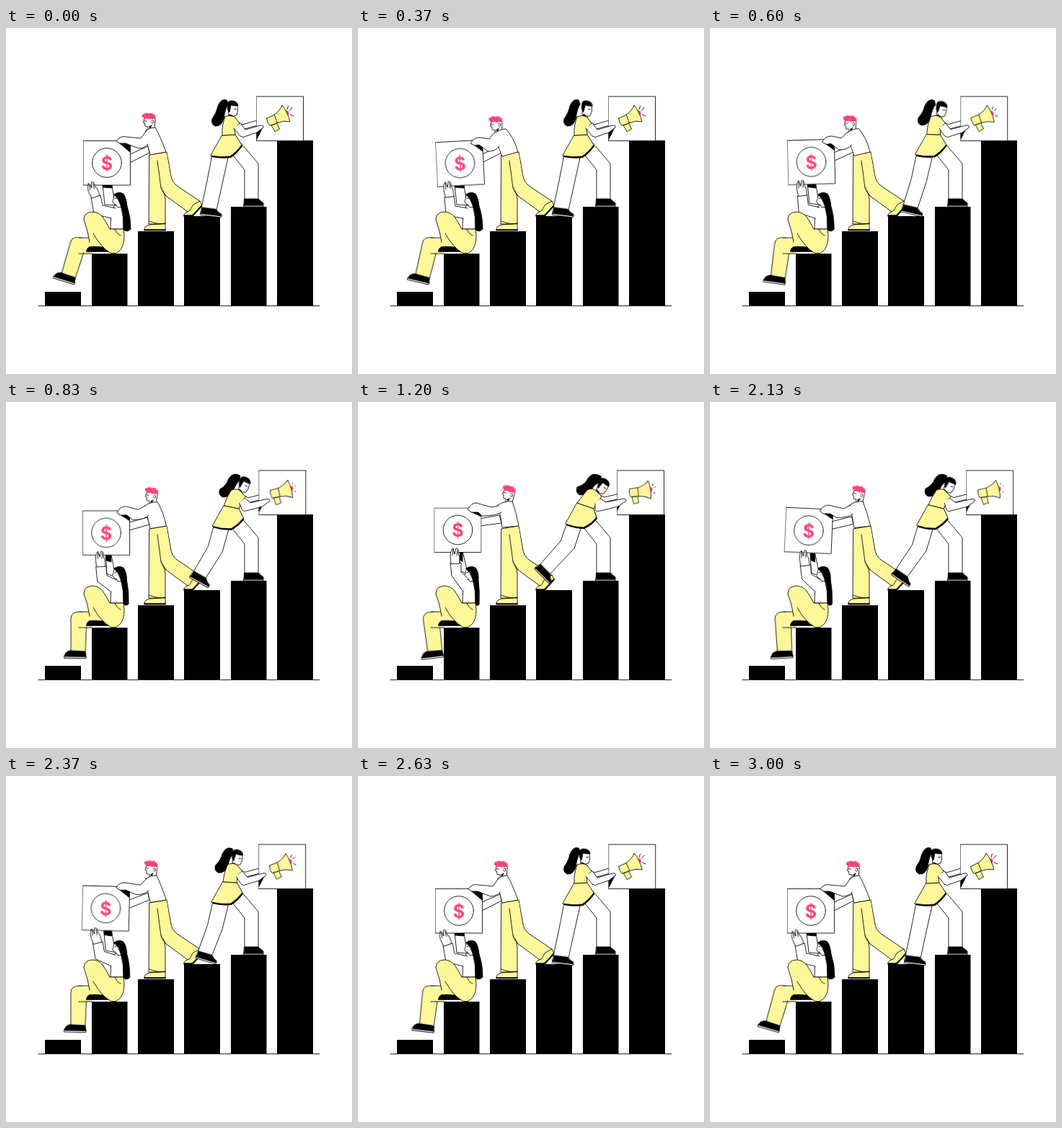
An HTML page without scripts that plays this animation: 480x480 px, repeating every 3030 ms.

```html
<!DOCTYPE html>
<html lang="en">
<head>
<meta charset="utf-8">
<title>Growth steps</title>
<style>
html, body { margin: 0; width: 100%; height: 100%; overflow: hidden; background: #fff; }
svg { display: block; width: 100vw; height: 100vh; fill: #fff; stroke: #000; stroke-width: .85; stroke-linejoin: round; stroke-linecap: round; }
.y { fill: #fff79a; }
.k { fill: #000; }
.p { fill: #ff4578; stroke: none; }
.n { fill: none; }
text { font: 700 25px Inter, Roboto, sans-serif; text-anchor: middle; }

/* Each part has a rest pose --a, a stretched pose --b and, if it dips first, --e */
.shape, .turn, .swing, .rays { animation: 3.03s ease-in-out infinite; }
.shape { d: var(--a); animation-name: shape; }
.turn { animation-name: turn; }
@keyframes shape {
  0%, 88%, 100% { d: var(--a) }
  12% { d: var(--e, var(--a)) }
  40%, 60% { d: var(--b) }
}
@keyframes turn {
  0%, 88%, 100% { transform: var(--a, none) }
  12% { transform: var(--e, var(--a, none)) }
  40%, 60% { transform: var(--b) }
}

#ad { animation-name: slide; }
@keyframes slide {
  0%, 17%, 90%, 100% { transform: none }
  48%, 54% { transform: translate(14.2px, 0) }
}
#tilt { animation-name: tilt; transform-origin: 140px 187px; }
@keyframes tilt {
  0%, 28%, 57%, 87%, 100% { transform: none }
  12% { transform: translate(1.5px, .5px) rotate(-3deg) }
  71% { transform: translate(-2px, -2px) rotate(2.5deg) }
}
#shin { animation-name: kick; transform-origin: 102px 297px; }
@keyframes kick {
  0%, 100% { transform: rotate(17deg) }
  47%, 52% { transform: rotate(-8deg); animation-timing-function: ease-in }
}
.rays { animation-name: rays; }
@keyframes rays {
  0%, 14%, 85%, 100% { stroke-dasharray: 6 20; stroke-dashoffset: 0 }
  27%, 71% { stroke-dasharray: 1 20; stroke-dashoffset: -2 }
  50% { stroke-dasharray: 3 20; stroke-dashoffset: -1 }
}

#face { transform-origin: 198px 130px; --a: translate(0, 0) rotate(0deg); --e: translate(-7px, 4.5px) rotate(-3deg); --b: translate(10px, -2px) rotate(13deg); }
#head { transform-origin: 314px 112px; --e: translate(3px, 0) rotate(4deg); --b: translate(25px, 5px) rotate(28deg); }
#palm { --a: translate(124px, 233px) rotate(-20deg); --e: translate(127px, 233px) rotate(-8deg); --b: translate(135px, 223px) rotate(0deg); }
#shoe { --a: translate(272px, 249px) rotate(7deg); --b: translate(253px, 225px) rotate(45deg); }
#horn { transform-origin: 378px 123px; --b: translate(3px, 0) rotate(17deg); }
#corner { transform-origin: 347px 144px; --b: scale(.65); }
#coin { --b: translate(-1.5px, -9.5px); }
</style>
</head>
<body>
<svg viewBox="0 0 480 480">
  <path class="k" stroke="none" d="M54 366h50v19h-50zM119 313h49.500v72h-49.500zM183 282h50v103h-50zM247 261h50v124h-50zM312 248h49.500v137h-49.500zM376 156h50v229h-50z"/>
  <path d="M45 385.500H435"/>

  <!-- arms behind the coin box -->
  <path class="shape" style="--a:path('M134 217L137 245L151 246L147 217');--b:path('M141 207L142 234L153 240L145 207')"/>
  <path class="shape k" style="--a:path('M134 217L147 217L147 222L135 221Z');--b:path('M142 207L145 207L145 222L142 219Z')"/>
  <path class="shape" style="--a:path('M170 176L197 164L199 173L170 188');--b:path('M168 162L196 157L199 168L168 172')"/>

  <g id="coin" class="turn">
    <g id="tilt" class="swing">
      <path d="M107.500 156.500h65v61.500h-65z"/>
      <path class="shape k" stroke="none" style="--a:path('M156 159L172.500 173L172.500 163L166 159Z');--b:path('M156 161L172.500 169L172.500 163L166 158Z')"/>
      <circle cx="140" cy="187" r="20.300" class="n"/>
      <text x="140" y="196.500" class="p">$</text>
    </g>
  </g>

  <!-- seated woman -->
  <g id="shin" class="swing">
    <path class="y" d="M91 346L90 301Q90 291 102 291Q112 291 112 304L111 346Z"/>
    <path d="M82 352H112V355.500H82Z"/>
    <path class="k" d="M82.500 353Q82 347 90 345L111 346L112 353Z"/>
  </g>
  <path class="y" stroke="none" d="M102 291.400H120V312.600H108Z"/>
  <path class="n" d="M102 291H118M101 313H119"/>
  <path class="y" stroke="none" d="M108 264Q114 284 117 305H142L130 268Z"/>
  <path class="k" d="M111.500 310Q112 304 118 303L137 304L142 310Z"/>
  <path d="M150 247Q157 243 162 248L163 279H145L145.500 264Z"/>
  <path d="M152 231Q148 234 149 238L147.500 240.500L150 244Q154 245 155 249L161 248L160 235Z"/>
  <path class="n" d="M151 236.500l2-.5"/>
  <path class="shape k" style="--a:path('M150 231Q156 226 163 230Q167 236 168 247Q173 262 173 279Q168 284 163 280Q164 262 159 246Q157 238 150 231Z');--b:path('M150 231Q156 226 163 230Q168 236 167 247Q169 262 168 281Q165 284 163 280Q164 262 159 246Q157 238 150 231Z')"/>
  <path class="shape" style="--a:path('M146 264L122 258L118 235L131 232L134 246L152 250');--e:path('M146 264L122 260L120 235L133 233L135 247L152 250');--b:path('M146 263L130 241L128 223L143 223L143 236L152 244')"/>
  <g id="palm" class="turn">
    <path d="M-6 1L-7-9Q-6-19-3-20L-1-12L1-20Q5-21 4-13L6-8L6 1Z"/>
    <path class="n" d="M-4-10l1-9M2-10l1-8"/>
  </g>
  <path class="y" stroke="none" d="M108 264Q110 255 121 255Q129 256 134 262Q139 269 144 279H163Q166 296 160 306Q154 315 145 312Q132 305 121 285Q118 300 121 303L117 303Q115 282 108 264Z"/>
  <path class="n" d="M116 297Q114 282 108 266Q108 255 121 255Q129 256 134 262Q139 269 144 279H163Q166 296 160 306Q154 315 145 312Q132 305 121 285M151 279Q154 286 159 288"/>

  <!-- man -->
  <g id="face" class="turn">
    <path d="M192 125L190.500 131.500L192.500 132L193 136.500L197 137V143H206L207 126Z"/>
    <path class="k" d="M198 137L203 134L200 140Z" stroke="none"/>
    <path class="n" d="M192 129l3 0M201.500 129q3-3 3 1t-3 1"/>
    <path class="p" d="M189 123Q188 119 192 119Q195 117 198 118.500Q203 117 205 120Q209 121 207 127L203 125L200 127L197 125L193 126.500Z"/>
  </g>
  <path class="y" d="M206 180L223 172L229 206Q230 213 236 218L270 241L255 257L222 233L210 218Z"/>
  <path class="y" d="M260 245L269 240L272 246L258 260H247Q247 256 254 254Z"/>
  <path class="n" d="M272 246L259 260.500H247" stroke-width="2"/>
  <path class="y" d="M199 176L222 172Q220 205 216 222Q221 229 221 238V272H198.500Z"/>
  <path class="y" stroke="none" d="M211 185L222.600 172L228 206L217 226Z"/>
  <path class="n" d="M210 184Q213 206 215 222Q217 228 222 233M199 268Q210 273 221 271"/>
  <path class="y" d="M221 272V280H192Q192 274 199 273Z"/>
  <path d="M192 280.300H221" stroke-width="2"/>
  <path class="shape" style="--a:path('M194 142Q200 138 207 138Q214 150 222 172L200 176L197 164Z');--e:path('M189 146Q198 140 205 140Q216 151 222 172L200 178L196 168Z');--b:path('M194 143Q203 137 214 138Q220 154 223 172L200 174L198 160Z')"/>
  <path class="shape" style="--a:path('M196 141L187 153L167 151Q158 149 153 157L158 160L166 160L184 167Q192 167 197 161');--e:path('M190 144L182 154L170 152Q161 151 156 160L162 163L168 162L180 171Q190 172 196 164');--b:path('M195 144L185 146L164 140Q157 140 152 149L157 153L167 153L172 158Q192 158 199 153')"/>

  <!-- standing woman -->
  <path d="M308 168L331 197V240H350V188L326 160Z"/>
  <path class="k" d="M331 237H350L357 243V246H330Z"/>
  <path d="M330 246.300H357V248H330Z"/>
  <path class="shape" style="--a:path('M286 176L279 212L271 250L292 253L300 216L309 176');--b:path('M290 168L281 193L252 226L266 239L300 203L311 170')"/>
  <g id="shoe" class="turn">
    <path d="M-1 8H28V10.500H-1Z"/>
    <path class="k" d="M0 0H19Q24 5 28 6V8.500H-1Z"/>
  </g>
  <path class="shape" style="--a:path('M320 129L328 134L349 128L349 135L328 141L320 137');--b:path('M333 128L342 132L363 127L363 134L342 139L334 136')"/>
  <g style="--a:path('M300 149L318 148L327 162Q320 172 311 178Q298 180 284 177Z');--b:path('M304 140L327 148L331 160Q324 169 313 174Q300 174 288 169Z')">
    <path class="shape k" stroke="none" transform="translate(1 2)"/>
    <path class="shape y"/>
  </g>
  <path class="shape k" style="--a:path('M306 100Q299 97 294 108Q292 118 286 126Q284 133 290 136Q299 137 302 126Q304 112 308 106Z');--b:path('M337 103Q326 96 319 106Q315 115 304 118Q301 126 308 129Q320 129 325 120Q329 113 337 111Z')"/>
  <g id="head" class="turn">
    <path d="M308 106L309 126L317 127L316 122L320 121L321.500 115L321 106Z"/>
    <path class="k" d="M307 106Q307 101 313 101Q321 101 322 108Q315 108 312 107L310 117L307.500 113Z"/>
    <path class="k" d="M309.500 119L316 122L310 124Z" stroke="none"/>
    <path class="n" d="M316.500 112.500h3"/>
  </g>
  <path class="shape y" style="--a:path('M304 123Q312 120 318 124L324 132L317 139L318 148L300 149Q299 136 304 123Z');--b:path('M318 122Q324 119 329 122L338 131L333 138L327 148L304 140Q310 132 318 122Z')"/>

  <g id="ad" class="swing">
    <path d="M347.500 95h65v61.500h-65z"/>
    <path id="corner" class="turn k" stroke="none" d="M347.500 144L357 137L347.500 156Z"/>
    <g id="horn" class="turn">
      <circle cx="389" cy="118" r="3.600" class="p"/>
      <path class="y" d="M368.500 135L375.500 132L379.500 140L373.500 143.500Z"/>
      <path class="y" d="M361.500 125.500L372 120.500Q380 115 383 107Q391 117 394 130Q385 128 376.500 131.500L366 135.500Q362 131 361.500 125.500Z"/>
      <path class="n" d="M372 120.500L376.500 131.500"/>
      <path class="rays n" d="M390 113L391.500 108M393 114.500L397 110M394 120L399 122"/>
    </g>
  </g>
  <path class="shape" style="--a:path('M316 139L325 150Q329 153 333 150L348 145L357 138Q358 133 350 136L332 141L325 132');--b:path('M329 141L329 149Q331 153 336 151L361 145L372 137Q372 133 364 135L344 139L336 134')"/>
</svg>
</body>
</html>
```
